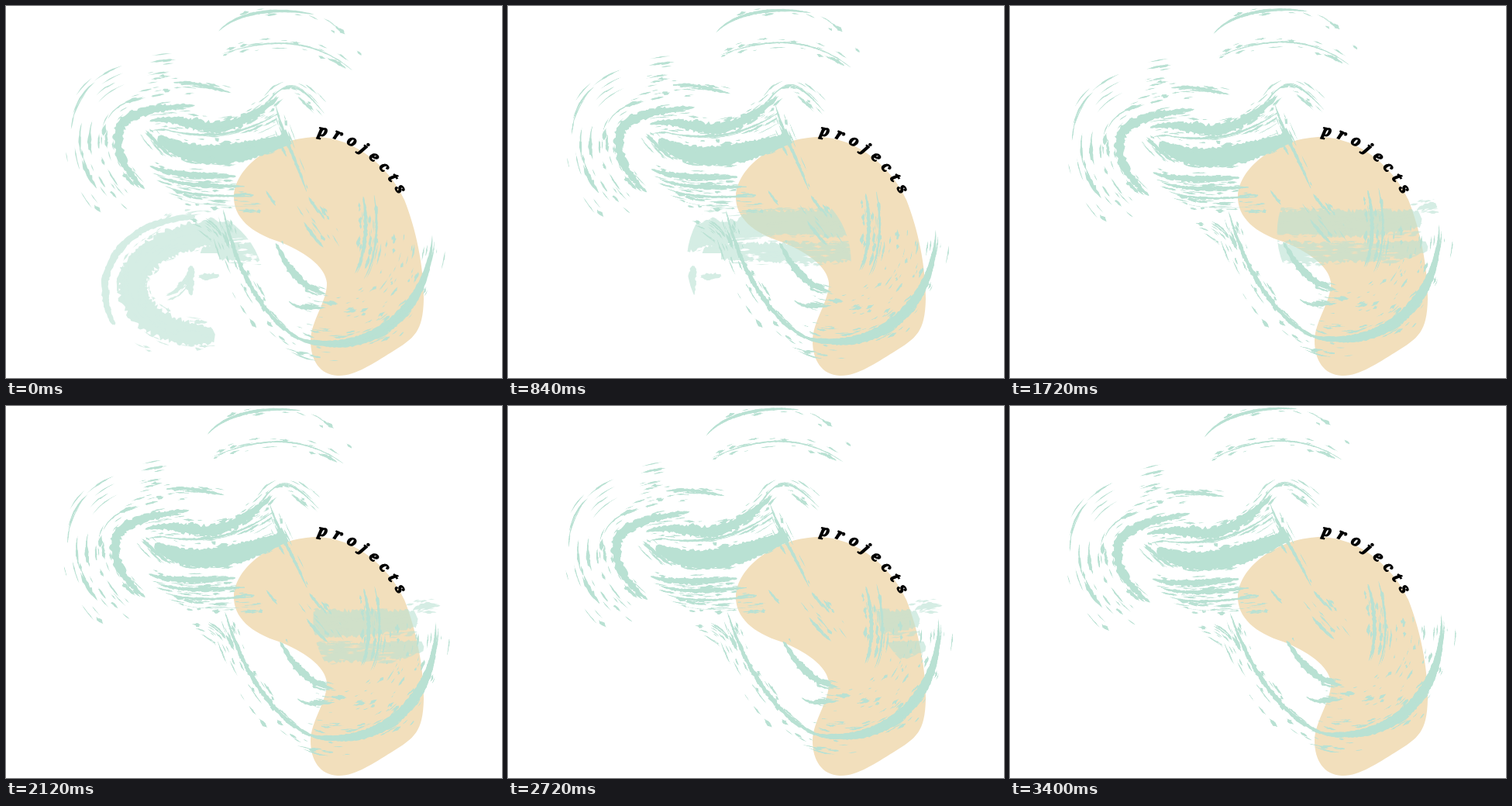
An HTML page with a canvas for the animation above (5.8 s loop, 640 by 480 pixels).

```html
<!DOCTYPE html>
<html lang="en">
<head>
<meta charset="utf-8">
<title>Projects</title>
<style>
  html, body { margin: 0; width: 100%; height: 100%; overflow: hidden; background: #fff; }
  canvas, svg { position: absolute; left: 0; top: 0; width: 640px; height: 480px; }
  text { font: italic 900 19px "Noto Serif", serif; letter-spacing: 8px; stroke: #000; stroke-width: 1.3; }
</style>
</head>
<body>
<canvas id="stage" width="640" height="480"></canvas>
<svg viewBox="0 0 640 480">
  <path id="curve" d="M402 167C446 171 488 204 513 256" fill="none"/>
  <text><textPath href="#curve">projects</textPath></text>
</svg>
<script>
const W = 640, H = 480, LOOP = 5800, TICK = 40, MOVE = 3400, SCALE = 2;
const GREEN = '#b9e1d3', SAND = '#f2dfbc';
const blob = new Path2D(`M294 245C296 205 350 169 402 169C460 171 501 220 514 250
  C529 288 539 335 539 378C538 420 528 428 497 447C474 461 450 478 428 477
  C405 476 393 457 393 432C393 407 415 380 414 357C412 335 383 316 352 304
  C317 293 293 273 294 245Z`);

// seeded random numbers, 0 to 1
let seed = 11;
function rnd() {
  seed = (seed + 0x6D2B79F5) | 0;
  let v = Math.imul(seed ^ (seed >>> 15), 1 | seed);
  v = (v + Math.imul(v ^ (v >>> 7), 61 | v)) ^ v;
  return ((v ^ (v >>> 14)) >>> 0) / 4294967296;
}

// evenly spaced points with normals; a positive shift lies right of the direction of travel
function trace(d, gap, shift) {
  const path = document.createElementNS('http://www.w3.org/2000/svg', 'path');
  path.setAttribute('d', d);
  const length = path.getTotalLength(), n = Math.ceil(length / gap);
  const points = Array.from({ length: n + 1 }, (_, i) => {
    const s = length * i / n;
    const a = path.getPointAtLength(s - 1), b = path.getPointAtLength(s + 1);
    const len = Math.hypot(b.x - a.x, b.y - a.y);
    const nx = (a.y - b.y) / len, ny = (b.x - a.x) / len;
    return { x: (a.x + b.x) / 2 + nx * shift, y: (a.y + b.y) / 2 + ny * shift, nx, ny };
  });
  return { points, length };
}

// torn ribbon, pointed at both ends
function ribbon(ctx, points, width, rough, soft, offset = 0) {
  const last = points.length - 1;
  const side = s => points.map((p, i) => {
    const swell = Math.sin(Math.PI * i / last) ** soft;
    const o = offset + s * width / 2 * swell * (1 + rough * (rnd() - .5));
    const slip = rough * (rnd() - .5) * 4;
    return [p.x + p.nx * o + p.ny * slip, p.y + p.ny * o - p.nx * slip];
  });
  ctx.beginPath();
  side(1).concat(side(-1).reverse()).forEach(p => ctx.lineTo(...p));
  ctx.fill();
}

// dry brush stroke: a solid core inside a spread of loose slivers
function swath(ctx, d, { spread = 16, core = 0, cover = .2, shift = 0, soft = .6, rough = .7 }) {
  const { points, length } = trace(d, 2.5, shift);
  if (core) ribbon(ctx, points, core, rough, soft);
  for (let k = length * spread * cover / 30; k > 0; k--) {
    const n = Math.min(points.length - 1, 3 + Math.floor(rnd() * rnd() * 11));
    const from = Math.floor(rnd() * (points.length - n));
    ribbon(ctx, points.slice(from, from + n + 1), 1 + 4 * rnd() ** 3, 1, 1, (rnd() - .5) * spread);
  }
}

function layer(paint) {
  const canvas = document.createElement('canvas');
  canvas.width = W * SCALE;
  canvas.height = H * SCALE;
  const ctx = canvas.getContext('2d');
  ctx.scale(SCALE, SCALE);
  ctx.fillStyle = GREEN;
  paint((d, look) => swath(ctx, d, look), ctx);
  return canvas;
}

const strokes = layer((brush, ctx) => {
  // crown
  brush('M274 33C300 5 355 2 398 11', { spread: 9, core: 4, rough: .3 });
  brush('M390 12C430 28 445 48 468 72', { spread: 10 });
  brush('M278 62C330 45 390 35 448 84', { core: 2, cover: .25 });

  // hook with fading rings around it
  for (let k = 0; k < 4; k++) {
    brush('M180 237C138 200 138 160 155 147S200 131 245 128',
      { core: k ? 0 : 12, shift: -21 * k, cover: .34 - .07 * k });
  }
  brush('M215 99C235 97 255 102 290 112', { spread: 14, core: 5 });

  // wave, ridge and hull
  brush('M185 149C240 135 265 190 352 117', { spread: 26, core: 14, cover: .3 });
  brush('M335 128C365 85 385 108 411 139', { spread: 24, core: 2, cover: .35 });
  brush('M348 128C358 170 375 200 388 240', { spread: 22, core: 4 });
  brush('M200 158C260 175 310 165 352 138', { spread: 24, core: 3 });
  brush('M180 160C188 168 195 180 215 195', { spread: 22, core: 5, cover: .3 });
  brush('M196 168C230 200 290 198 368 170', { spread: 34, core: 26, cover: .1, rough: .3, soft: .4 });
  ctx.fill(new Path2D('M330 192L361 159L369 178Z'));

  // layers under the hull
  for (let i = 0; i < 4; i++) {
    brush(`M${185 + 10 * i} ${206 + 13 * i}c35 16 75 12 115 14`, { core: 8 - 2.5 * i, cover: .32 });
  }
  brush('M235 275C265 280 275 300 280 320', { spread: 20, cover: .4 });

  // long sweep with parallel marks
  const left = 'M280 262C310 400 380 440 410 438', right = 'M365 425C470 465 548 390 550 295';
  brush(left, { spread: 18, core: 6 });
  brush(left, { shift: 17, cover: .12 });
  brush(right, { spread: 6, core: 14, rough: .25, soft: 1 });
  for (let shift = 14; shift > -70; shift -= 17) brush(right, { shift, cover: .14 });
  brush('M348 305C365 345 385 365 414 372', { core: 9, cover: .3 });
  brush('M365 381C378 393 395 390 413 389', { spread: 8, core: 4 });

  // marks over the sand shape
  brush('M335 238L348 258', { spread: 6, core: 3 });
  brush('M385 250C400 275 415 295 428 318', { spread: 32, cover: .28 });
  for (const k of [0, 1]) {
    brush('M461 245C468 290 462 325 450 345', { shift: -14 * k, core: 5 - 2 * k, cover: .25 });
  }
}); 

const veil = layer((brush, ctx) => {
  const solid = { soft: .2, rough: .4, cover: .3 };
  brush('M140 412C105 350 145 275 245 272', { ...solid, spread: 10, core: 9 });
  brush('M270 424C215 428 163 400 163 362S215 287 330 290', { ...solid, spread: 44, core: 36 });
  brush('M150 425C165 438 175 442 187 445', { spread: 8 });
  brush('M190 288C220 262 250 262 290 262', { ...solid, spread: 14 });
  brush('M295 281C370 275 440 288 532 274', { ...solid, spread: 40, core: 34 });
  brush('M250 318C330 315 430 324 540 310', { ...solid, spread: 32, core: 25 });
  brush('M524 263C540 255 550 258 560 258', { spread: 18, core: 7, cover: .5 });

  // white gaps
  ctx.globalCompositeOperation = 'destination-out';
  brush('M285 305C360 297 440 302 490 302', { spread: 9, core: 4, cover: .7 });
  brush('M300 324C380 318 440 322 520 318', { spread: 28 });
  ctx.fillRect(247, 319, 28, 29);
  ctx.globalCompositeOperation = 'source-over';

  // scraps inside the curl
  brush('M248 350L276 348', { spread: 10, core: 8 });
  brush('M241 334C235 350 236 360 239 374', { spread: 10, core: 11 });
  brush('M206 374C220 370 228 360 235 345', { spread: 16, core: 4, cover: .4 });
});

const ctx = document.getElementById('stage').getContext('2d');
const pivot = [325, 231];

function draw(time) {
  const sec = Math.min(Math.floor(time / TICK) * TICK, MOVE) / 1000;
  ctx.clearRect(0, 0, W, H);
  ctx.fillStyle = SAND;
  ctx.fill(blob);

  // round window gliding along the pale stroke
  ctx.save();
  ctx.beginPath();
  ctx.arc(228 + 129.4 * sec, 365 - 42 * sec, 106, 0, Math.PI * 2);
  ctx.clip();
  ctx.globalAlpha = .6;
  ctx.drawImage(veil, 0, 0, W, H);
  ctx.restore();

  // two degrees per second, anticlockwise
  ctx.save();
  ctx.translate(...pivot);
  ctx.rotate(-2 * sec * Math.PI / 180);
  ctx.drawImage(strokes, -pivot[0], -pivot[1], W, H);
  ctx.restore();
}

const start = performance.now();
function frame() {
  draw((performance.now() - start) % LOOP);
  requestAnimationFrame(frame);
}
frame();
</script>
</body>
</html>
```
